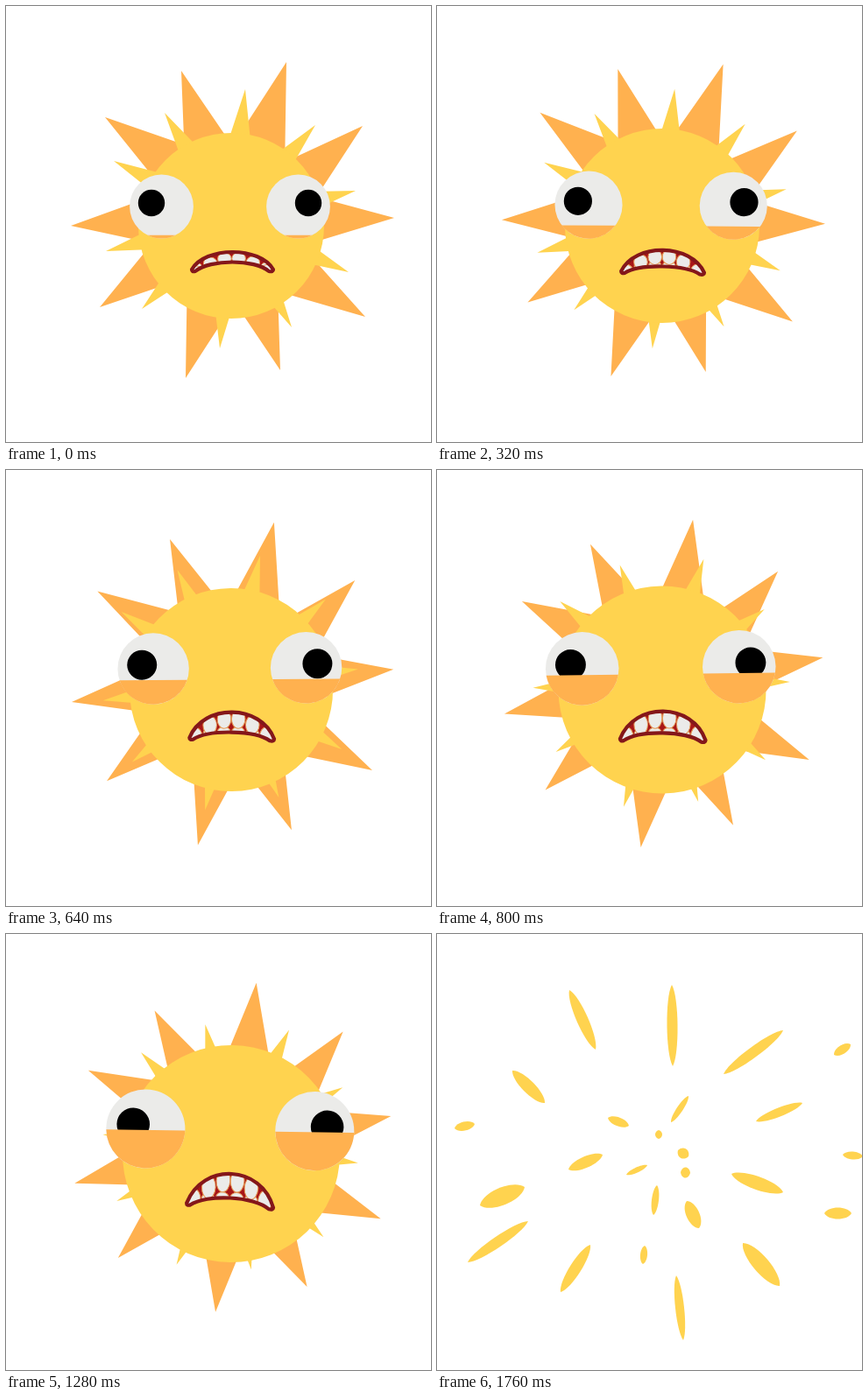
An HTML page with a canvas that plays this animation: 485x498 px, repeating every 1840 ms.

```html
<!DOCTYPE html>
<html lang="en">
<head>
<meta charset="utf-8">
<title>Bursting sun</title>
<style>
  html, body { margin: 0; width: 100%; height: 100%; overflow: hidden; background: #fff; }
  canvas { display: block; }
</style>
</head>
<body>
<canvas id="stage" width="485" height="498"></canvas>
<script>
const ctx = document.getElementById('stage').getContext('2d');
const STEP = 80, STEPS = 23;
const YELLOW = '#ffd34f', ORANGE = '#ffb14f', WHITE = '#ebebe9', LIP = '#84171a', RED = '#a81618';
const CENTER = [257, 248];
const rad = degrees => degrees * Math.PI / 180;

// Ray tips, each with the skew of its base in degrees.
const bigRays = [
  [200, 74, 0.5], [320, 64, -2], [407, 137, -5], [443, 242, 0], [410, 355, -3.7],
  [313, 416, 0], [205, 425, 0.5], [107, 344, -1.5], [74, 251, -2], [113, 127, -4]
];
const smallRays = [
  [273, 95], [353, 136], [399, 211], [391, 304], [326, 367],
  [244, 391], [155, 346], [114, 280], [123, 177], [181, 122]
];

// Burst splinters: both ends and the width.
const splinters = [
  [151, 64, 181, 132, 13], [268, 58, 269, 151, 12], [395, 110, 327, 160, 12],
  [472, 126, 453, 138, 10], [417, 193, 364, 214, 10], [86, 156, 123, 193, 14],
  [20, 222, 43, 217, 10], [195, 210, 219, 219, 10], [287, 185, 267, 215, 7],
  [253, 224, 253, 234, 8], [275, 247, 287, 254, 12], [278, 272, 289, 273, 12],
  [150, 269, 189, 252, 13], [216, 275, 240, 264, 6], [49, 310, 100, 289, 20],
  [35, 375, 104, 328, 12], [141, 409, 175, 355, 13], [251, 287, 247, 321, 8],
  [285, 305, 299, 336, 15], [237, 356, 235, 377, 8], [273, 390, 281, 464, 10],
  [349, 353, 391, 402, 18], [336, 274, 395, 295, 15], [442, 319, 473, 319, 13],
  [463, 252, 486, 254, 9]
];

// Motion keys: [step, value].
const bodyRadius = [[0, 106], [13, 122.3], [16, 124]];
const bigSpin = [[0, 0], [3, 1.7], [4, 1.7], [8, -4], [11, -9.9], [13, -11.1], [16, -11.4], [19, -8]];
const smallSpin = [[0, 0], [4, -1.1], [8, 7], [11, 16], [13, 18.9], [16, 19.2]];
const smallScale = [[16, 1], [19, 0.8]];
const tiltKeys = [[0, 0], [4, 0.4], [8, -0.4], [12, -1], [13, 2.7], [14, -2], [16, 0.8], [17, -1], [19, 3]];
const sunScale = [[16, 1], [17, 0.95], [18, 0.8], [19, 0.605], [20, 0.28], [21, 0]];
const burstScale = [[19, 0], [20, 0.4], [21, 0.83], [22, 1]];

function at(keys, step) {
  const next = keys.findIndex(key => key[0] >= step);
  if (next < 0) return keys[keys.length - 1][1];
  if (next === 0) return keys[0][1];
  const [a, from] = keys[next - 1], [b, to] = keys[next];
  return from + (to - from) * (step - a) / (b - a);
}

function group(x, y, degrees, scale, draw) {
  ctx.save();
  ctx.translate(x, y);
  ctx.rotate(rad(degrees));
  ctx.scale(scale, scale);
  draw();
  ctx.restore();
}

function disc(x, y, rx, ry, color) {
  ctx.fillStyle = color;
  ctx.beginPath();
  ctx.ellipse(x, y, rx, ry, 0, 0, 2 * Math.PI);
  ctx.fill();
}

function rays(tips, cx, cy, spin, scale, halfAngle, color) {
  group(cx, cy, spin, scale, () => {
    ctx.fillStyle = color;
    ctx.beginPath();
    for (const [tx, ty, skew = 0] of tips) {
      const x = tx - cx, y = ty - cy;
      const inward = Math.atan2(-y, -x) + rad(skew);
      const length = Math.hypot(x, y) * 0.53;
      ctx.moveTo(x, y);
      for (const side of [-1, 1]) {
        const angle = inward + side * rad(halfAngle);
        ctx.lineTo(x + length * Math.cos(angle), y + length * Math.sin(angle));
      }
      ctx.closePath();
    }
    ctx.fill();
  });
}

function eye(side, step) {
  const x = side * 78, y = -22, r = 36.4;
  disc(x, y, r, r, WHITE);
  disc(x + side * 11.5, y - 4, 15.2, 15.2, '#000');
  const lid = Math.asin(Math.max(0.03, 0.9 - 0.0725 * step));
  ctx.fillStyle = ORANGE;
  ctx.beginPath();
  ctx.arc(x, y, r, lid, Math.PI - lid);
  ctx.fill();
}

function mouth(open) {
  const w = 46.5 + 3 * open, corner = 9 * open + 6;
  const top = -14 - 7 * open, bottom = -3 + 9 * Math.sqrt(open);
  const archY = (mid, x) => corner + (mid - corner) * (1 - (x / w) ** 2);
  const control = mid => corner + (mid - corner) / 0.75;

  ctx.beginPath();
  ctx.moveTo(-w, corner);
  ctx.bezierCurveTo(-w * 0.68, control(top), w * 0.68, control(top), w, corner);
  ctx.quadraticCurveTo(w, corner + 3, w - 5, corner + 2);
  ctx.bezierCurveTo(w * 0.55, control(bottom), -w * 0.55, control(bottom), -w + 4, corner + 2);
  ctx.quadraticCurveTo(-w, corner + 3, -w, corner);
  ctx.closePath();

  ctx.fillStyle = RED;
  ctx.fill();
  ctx.save();
  const outline = new Path2D();
  ctx.clip();
  ctx.strokeStyle = '#e59a55';
  ctx.lineWidth = 1;
  for (let k = -2.5; k <= 2.5; k++) {
    const x = k * 16.2 - 1;
    disc(x, archY(bottom, x), 7.4, 6, WHITE);
    ctx.stroke();
    disc(x, archY(top, x) + 7, 7.8, 7 + 6 * open, WHITE);
    ctx.stroke();
  }
  ctx.restore();

  ctx.beginPath();
  ctx.moveTo(-w, corner);
  ctx.bezierCurveTo(-w * 0.68, control(top), w * 0.68, control(top), w, corner);
  ctx.quadraticCurveTo(w, corner + 3, w - 5, corner + 2);
  ctx.bezierCurveTo(w * 0.55, control(bottom), -w * 0.55, control(bottom), -w + 4, corner + 2);
  ctx.quadraticCurveTo(-w, corner + 3, -w, corner);
  ctx.closePath();
  ctx.strokeStyle = LIP;
  ctx.lineWidth = 4.2;
  ctx.lineJoin = 'round';
  ctx.stroke();
}

function sun(step) {
  const scale = at(sunScale, step);
  const open = Math.min(1, step / 13);
  const drift = Math.max(0, step - 16) * -0.8;
  group(CENTER[0] + drift, CENTER[1], at(tiltKeys, step), scale, () => {
    ctx.translate(-CENTER[0], -CENTER[1]);
    rays(bigRays, 258, 245, at(bigSpin, step), 1, 16, ORANGE);
    rays(smallRays, 257, 244, at(smallSpin, step), at(smallScale, step), 12, YELLOW);
    const r = at(bodyRadius, step);
    disc(257, 251, r, r, YELLOW);
    group(255.5, 251, 0, 1 + 0.0148 * Math.min(step, 16), () => {
      eye(-1, step);
      eye(1, step);
    });
    group(258.5 - 1.5 * open, 295, 2.2 * open, 1, () => mouth(open));
  });
}

function burst(scale) {
  group(...CENTER, 0, scale, () => {
    ctx.translate(-CENTER[0], -CENTER[1]);
    ctx.fillStyle = YELLOW;
    for (const [x1, y1, x2, y2, width] of splinters) {
      const length = Math.hypot(x2 - x1, y2 - y1), bulge = width * 0.67;
      ctx.save();
      ctx.translate(x1, y1);
      ctx.rotate(Math.atan2(y2 - y1, x2 - x1));
      ctx.beginPath();
      ctx.moveTo(0, 0);
      ctx.bezierCurveTo(length * 0.15, bulge, length * 0.85, bulge, length, 0);
      ctx.bezierCurveTo(length * 0.85, -bulge, length * 0.15, -bulge, 0, 0);
      ctx.fill();
      ctx.restore();
    }
  });
}

function frame() {
  const step = Math.floor(performance.now() / STEP) % STEPS;
  ctx.fillStyle = '#fff';
  ctx.fillRect(0, 0, 485, 498);
  if (step > 19) burst(at(burstScale, step));
  if (step < 21) sun(step);
  requestAnimationFrame(frame);
}
frame();
</script>
</body>
</html>
```
